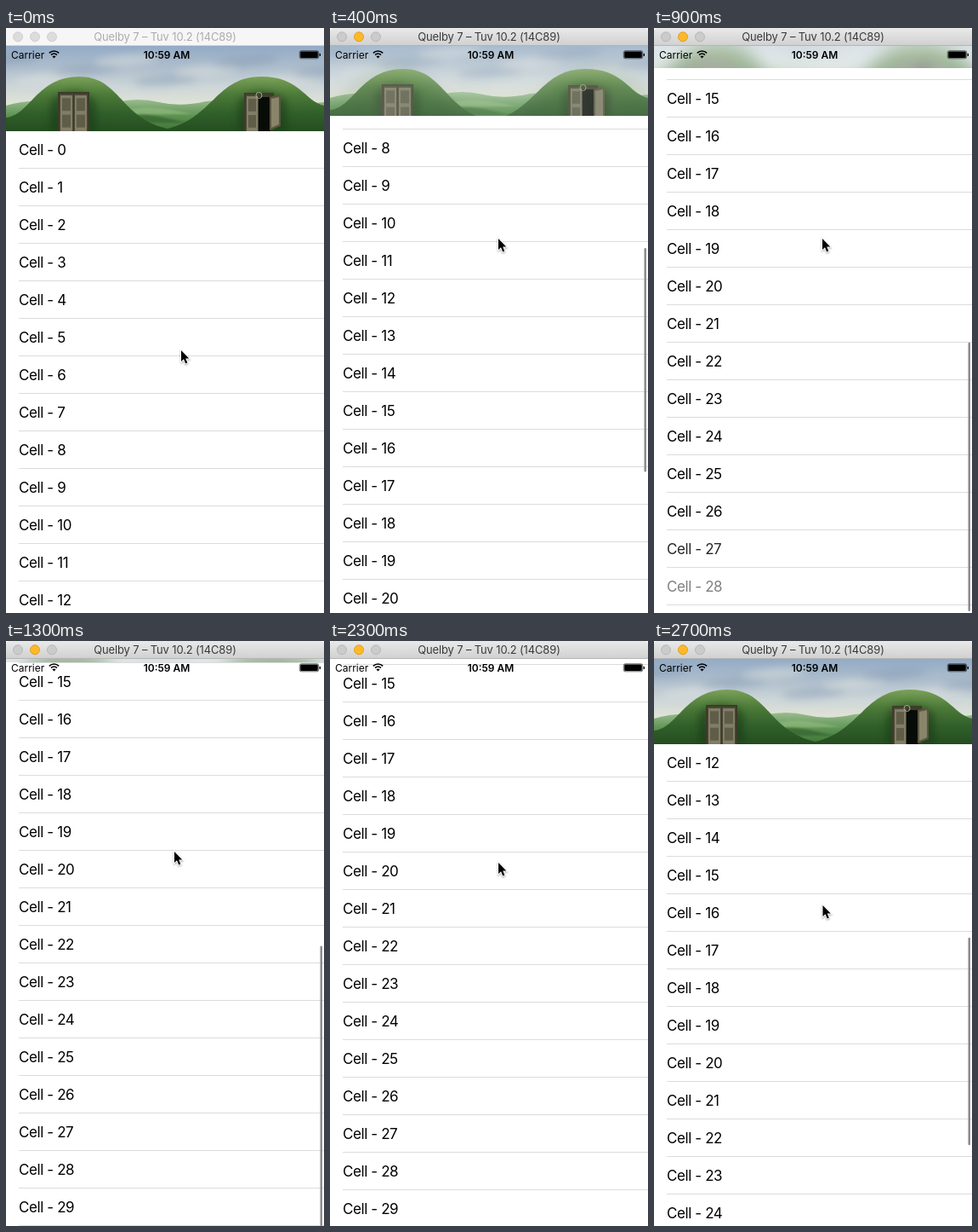
Animation of 374 by 686 pixels, one loop 2800 ms. Source, as an HTML page with a canvas:

```html
<!DOCTYPE html>
<html lang="en">
<head>
<meta charset="utf-8">
<title>Collapsing header</title>
<style>
html, body { margin: 0; width: 100%; height: 100%; overflow: hidden; background: #fff; }
canvas { display: block; width: 374px; height: 686px; }
</style>
</head>
<body>
<canvas id="stage" width="374" height="686"></canvas>
<script>
const W = 374, H = 686, BAR = 21, HEAD = 100, ROW = 44, ROWS = 30, LIST_END = 688;
const LOOP = 2800, STEP = 100;
const g = document.getElementById('stage').getContext('2d');
const font = (size, weight = 400) => `${weight} ${size}px Inter, "Liberation Sans", sans-serif`;
const clamp = v => Math.max(0, Math.min(1, v));

// Motion tracks: [time, value] pairs
const tracks = {
  head: [[100, 100], [200, 98], [300, 92], [400, 82], [700, 46], [800, 35], [900, 26], [1000, 18],
    [1100, 12], [1300, 4], [1400, 1], [1500, 0], [2300, 0], [2400, 12], [2500, 45], [2600, 82], [2700, 100]],
  scroll: [[0, 0], [100, 20], [200, 120], [400, 336], [500, 424], [600, 500], [700, 562], [800, 610], [900, 646],
    [1000, 668], [1100, 672], [1300, 659], [1400, 655], [1500, 653], [2300, 653], [2400, 645], [2700, 528]],
  x: [[0, 206], [100, 205], [300, 198], [2200, 198], [2700, 198.5]],
  y: [[0, 378], [100, 366], [300, 247], [2200, 247], [2300, 260], [2700, 310]],
  thumb: [[0, 0], [100, 1], [1400, 1], [1700, .03], [2200, .03], [2300, 0], [2400, 1]]
};

function at(name, t) {
  const keys = tracks[name], i = keys.findIndex(k => k[0] > t);
  if (i < 0) return keys[keys.length - 1][1];
  if (i === 0) return keys[0][1];
  const [t0, a] = keys[i - 1], [t1, b] = keys[i];
  return a + (b - a) * (t - t0) / (t1 - t0);
}

function layer(draw) {
  const c = document.createElement('canvas');
  c.width = W;
  c.height = HEAD;
  draw(c.getContext('2d'));
  return c;
}

function fade(c, y0, y1, ...colors) {
  const f = c.createLinearGradient(0, y0, 0, y1);
  colors.forEach((color, i) => f.addColorStop(i / (colors.length - 1), color));
  return f;
}

function box(c, color, x, y, w, h) {
  c.fillStyle = color;
  c.fillRect(x, y, w, h);
}

function shape(c, color, path) {
  c.fillStyle = color;
  c.fill(new Path2D(path));
}

function leaf(c, x, y, w, h) {
  box(c, '#4b4936', x, y, w, h);
  box(c, '#817d66', x + 1, y + 2, w - 2, h - 2);
  for (const part of [.12, .56]) box(c, '#5f5d48', x + 3, y + h * part, w - 6, h * .34);
}

const scene = layer(c => {
  box(c, fade(c, 0, 72, '#93abc6', '#adbdcc', '#cdd6d8', '#e3e5d6'), 0, 0, W, HEAD);
  c.filter = 'blur(5px)';
  for (let i = 0; i < 9; i++) {
    c.fillStyle = i % 2 ? 'rgba(225,229,226,.5)' : 'rgba(126,148,176,.4)';
    c.beginPath();
    c.ellipse(i * 47, 16 + (i * 23) % 34, 38, 6, -.08, 0, 7);
    c.fill();
  }
  c.filter = 'none';
  const far = fade(c, 62, 100, '#9dbf91', '#5f9455', '#3d7336');
  shape(c, far, 'M0 70Q25 62 60 66T130 66Q155 60 180 66T235 65Q260 62 290 67T374 66V100H0Z');
  c.filter = 'blur(1px)';
  shape(c, 'rgba(150,190,130,.6)', 'M130 78Q165 68 200 76T265 74V77Q225 80 200 80T130 82Z');
  shape(c, 'rgba(42,88,38,.55)', 'M125 84Q160 76 195 86T265 80V90H125Z');
  c.filter = 'none';
  const hill = fade(c, 35, 100, '#7ca35a', '#4d7b39', '#31602a', '#254d20');
  shape(c, hill, 'M0 84C28 82 36 36 86 36C132 36 134 80 182 95L200 100H0Z');
  shape(c, hill, 'M172 100C244 94 242 36 300 36C346 36 350 64 374 70V100Z');
  c.filter = 'blur(4px)';
  shape(c, 'rgba(22,54,20,.5)', 'M52 100V64Q79 42 106 64V100ZM273 100V64Q300 42 330 64V100Z');
  c.filter = 'none';

  box(c, '#3d3a29', 61, 54, 37, 46);
  leaf(c, 63, 56, 16, 44);
  leaf(c, 80, 56, 16, 44);
  box(c, '#3f3d2b', 280, 55, 35, 45);
  box(c, '#080c08', 297, 60, 14, 40);
  leaf(c, 282, 57, 15, 43);
  shape(c, '#5a573f', 'M310 60L323 57V94L310 99Z');
  shape(c, '#89856b', 'M312 62L321 60V92L312 96Z');
  c.strokeStyle = '#a9ad91';
  c.beginPath();
  c.arc(297.5, 58, 3.5, 0, 7);
  c.stroke();
});

const frosted = layer(c => {
  c.filter = 'blur(9px)';
  c.drawImage(scene, -20, -8, W + 40, HEAD + 16);
  c.filter = 'none';
  box(c, 'rgba(244,248,252,.5)', 0, 0, W, HEAD);
});

function text(str, x, y, style, color, spacing = 0, align = 'left') {
  g.font = style;
  g.fillStyle = color;
  g.letterSpacing = spacing + 'px';
  g.textAlign = align;
  g.fillText(str, x, y);
}

function rounded(color, x, y, w, h, r) {
  g.fillStyle = color;
  g.beginPath();
  g.roundRect(x, y, w, h, r);
  g.fill();
}

function drawList(t, top, scroll) {
  for (let n = 0; n < ROWS; n++) {
    const y = Math.round(top + n * ROW - scroll);
    if (y + ROW < BAR || y > H) continue;
    // Late rows fade in while the list grows
    g.globalAlpha = n > 25 && t < 1400 ? clamp(.5 + (t - 900) / 250 + (28 - n) * .35) : 1;
    text('Cell - ' + n, 15, y + 28, font(17), '#000', -.4);
    g.globalAlpha = 1;
    box(g, '#dcdcde', 15, y + 43, W - 15, 1);
  }
}

function drawThumb(t, top, scroll, closed) {
  const view = LIST_END - top, total = ROWS * ROW;
  const lag = 42 * closed * (1 - closed);
  const y = top + scroll / total * view + lag;
  const h = Math.min(view * view / total + lag / 2, H - y);
  g.globalAlpha = at('thumb', t);
  rounded('#8c8c8c', 369.5, y, 2.5, h, 1.25);
  g.globalAlpha = 1;
}

function drawHeader(h, closed) {
  if (h <= 0) return;
  const slice = [0, (HEAD - h) / 2, W, h, 0, BAR, W, h];
  g.drawImage(scene, ...slice);
  g.globalAlpha = clamp(closed * 1.6);
  g.drawImage(frosted, ...slice);
  g.globalAlpha = 1;
}

function drawStatus() {
  text('Carrier', 6, 35.5, font(12), '#000');
  text('10:59 AM', 189, 35.5, font(12, 600), '#000', 0, 'center');
  g.strokeStyle = '#000';
  g.lineWidth = 1.7;
  for (const r of [4.8, 8]) {
    g.beginPath();
    g.arc(56.5, 35, r, -Math.PI * .75, -Math.PI * .25);
    g.stroke();
  }
  shape(g, '#000', 'M56.5 35.5L54.4 33.3Q56.5 31.6 58.6 33.3Z');
  g.lineWidth = .6;
  g.beginPath();
  g.roundRect(345.3, 26.8, 22.4, 9, 2);
  g.stroke();
  rounded('#000', 346.2, 27.6, 20.6, 7.4, 1.2);
  rounded('#000', 368.6, 29.7, 1.4, 3.4, .7);
}

function drawTitleBar(active) {
  box(g, '#fff', 0, 0, W, BAR);
  rounded(active ? fade(g, 0, BAR, '#e9e9e9', '#d0d0d0') : '#f6f6f6', 0, 0, W, BAR, [4, 4, 0, 0]);
  box(g, active ? '#b4b4b4' : '#d3d3d3', 0, BAR - 1, W, 1);
  [14, 34, 54].forEach((x, i) => {
    const lit = active && i === 1;
    g.fillStyle = lit ? '#fdb827' : active ? '#cbcbcb' : '#dcdcdc';
    g.strokeStyle = lit ? '#dfa023' : active ? '#b7b7b7' : '#cfcfcf';
    g.lineWidth = 1;
    g.beginPath();
    g.arc(x, 10.3, 5.5, 0, 7);
    g.fill();
    g.stroke();
  });
  text('Quelby 7 – Tuv 10.2 (14C89)', 187, 15, font(13), active ? '#3b3b3b' : '#acacac', -.15, 'center');
}

function drawCursor(x, y) {
  const arrow = new Path2D('M0 0V13L3 10.3L5.2 15.4L7.4 14.5L5.2 9.5H9.3Z');
  g.save();
  g.translate(x, y);
  g.shadowColor = 'rgba(0,0,0,.35)';
  g.shadowBlur = 2;
  g.shadowOffsetY = 1;
  g.strokeStyle = '#fff';
  g.lineWidth = 2;
  g.stroke(arrow);
  g.shadowColor = 'transparent';
  g.fillStyle = '#000';
  g.fill(arrow);
  g.restore();
}

function frame() {
  const t = Math.floor(performance.now() % LOOP / STEP) * STEP;
  const head = Math.round(at('head', t)), scroll = at('scroll', t);
  const top = BAR + head, closed = 1 - head / HEAD;
  box(g, '#fff', 0, 0, W, H);
  drawList(t, top, scroll);
  drawThumb(t, top, scroll, closed);
  box(g, '#fff', 0, 0, W, top);
  drawHeader(head, closed);
  drawStatus();
  drawTitleBar(t >= 100);
  drawCursor(at('x', t), at('y', t));
  requestAnimationFrame(frame);
}
frame();
</script>
</body>
</html>
```
